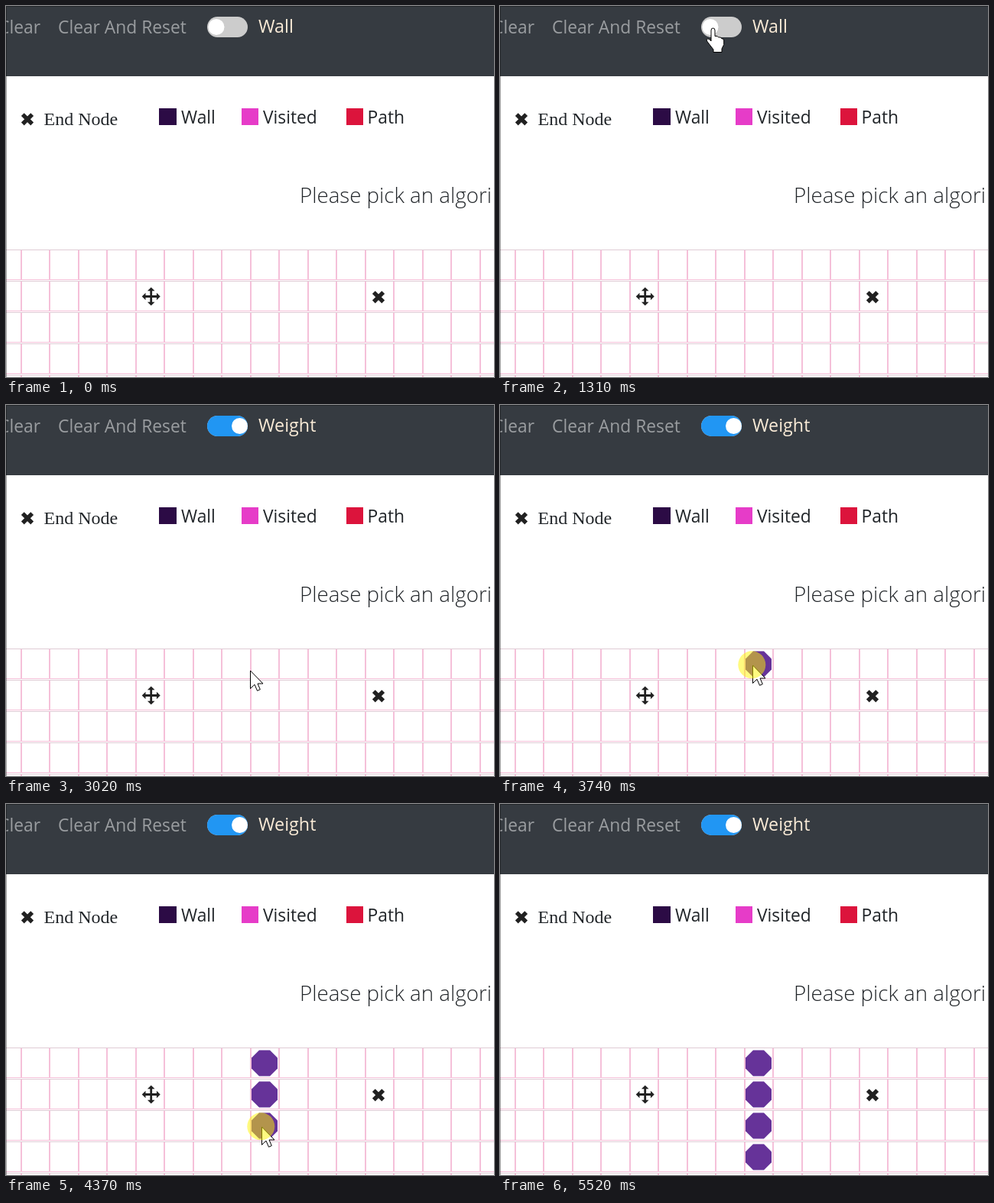
Write an HTML page that moves like this. It is 638 by 486 pixels and loops after 6360 ms.

```html
<!DOCTYPE html>
<html lang="en">
<head>
<meta charset="utf-8">
<title>Weighted grid</title>
<style>
  html, body { margin: 0; width: 100%; height: 100%; overflow: hidden; background: #fff; }
  svg { display: block; }
  text { font: 22.8px "Open Sans", "Noto Sans", sans-serif; fill: #212529; }
  .nav { fill: #9a9da0; }
  .mode { font-size: 23.3px; fill: #faebd7; }
  .serif { font: 24px "Liberation Serif", serif; }
  .title { font-size: 27.7px; font-weight: 300; }
  .crisp { shape-rendering: crispEdges; }
</style>
</head>
<body>
<svg width="638" height="486" viewBox="0 0 638 486">
  <defs>
    <path id="cross" d="M-6.2-6.2 6.2 6.2M6.2-6.2-6.2 6.2" stroke="#212121" stroke-width="5.4"/>
    <path id="arrows" fill="#212121" d="M-12 0l4.8-4.8v3.4h5.8v-5.8h-3.4L0-12l4.8 4.8H1.4v5.8h5.8v-3.4L12 0 7.2 4.8V1.4H1.4v5.8h3.4L0 12l-4.8-4.8h3.4V1.4h-5.8v3.4z"/>
  </defs>

  <rect width="638" height="92" fill="#363b41"/>
  <text class="nav" x="45" y="36" text-anchor="end">Clear</text>
  <text class="nav" x="68" y="36">Clear And Reset</text>
  <rect x="263" y="14" width="53" height="27" rx="13.5" fill="#ccc"/>
  <rect id="toggleOn" x="263" y="14" width="53" height="27" rx="13.5" fill="#2196f3"/>
  <circle id="knob" cy="27.5" r="10.5" fill="#fff"/>
  <text id="mode" class="mode" x="330" y="35">Wall</text>

  <use href="#cross" x="28" y="148.3"/>
  <text class="serif" x="49.5" y="156">End Node</text>
  <g class="crisp">
    <rect x="200" y="134" width="23" height="22" fill="#2c0b45"/>
    <rect x="308" y="134" width="22" height="22" fill="#e63cc8"/>
    <rect x="445" y="134" width="22" height="22" fill="#dc143c"/>
  </g>
  <text x="229" y="154">Wall</text>
  <text x="336" y="154">Visited</text>
  <text x="472.5" y="154">Path</text>
  <text class="title" x="384" y="258">Please pick an algori</text>

  <g id="grid" class="crisp"></g>
  <g id="weights"></g>
  <use href="#arrows" x="189.7" y="380.5"/>
  <use href="#cross" x="487" y="381.3"/>
  <path d="M.5 486V.5H638" fill="none" stroke="#000" stroke-opacity=".35"/>

  <g id="cursor" fill="#fff" stroke="#000" stroke-linejoin="round">
    <path id="pointer" d="M.5 1v23.5L6 19.2l3.5 8.1 3.8-1.7-3.3-7.6h7z"/>
    <path id="hand" d="M-2 3Q-2 0 .5 0T3 3v7.5q3.8-1 4.5 1.5 3.6-.8 4.2 1.7 3-.3 3 2.3v5.5L12 27v4.5H1V28l-7-9q-3-4-1-5 2-1 5 3z"/>
    <circle id="press" cx="-.7" cy=".3" r="18" fill="#fff600" fill-opacity=".5" stroke="none"/>
  </g>
</svg>
<script>
const LOOP = 6360, COLUMN = 37.5, ROW = 41, GRID_TOP = 319;
const $ = id => document.getElementById(id);
const clamp = v => Math.max(0, Math.min(1, v));
const progress = (t, start, end) => clamp((t - start) / (end - start));
const smooth = p => p * p * (3 - 2 * p);
const show = (node, on) => node.style.display = on ? "" : "none";

function add(parent, tag, attrs) {
  const node = document.createElementNS("http://www.w3.org/2000/svg", tag);
  for (const name in attrs) node.setAttribute(name, attrs[name]);
  return $(parent).appendChild(node);
}
const line = (x, y, width, height, fill) => add("grid", "rect", { x, y, width, height, fill });

for (let x = 20; x < 638; x += COLUMN) line(Math.floor(x) - 1, GRID_TOP, 2, 167, "#f5c0d9");
for (let y = GRID_TOP; y < 486; y += ROW) {
  line(0, y, 638, 1, "#dfcbd5");
  if (y > GRID_TOP) {
    line(0, y - 1, 638, 1, "#fff");
    line(0, y - 2, 638, 1, "#f5c0d9");
  }
}

const octagons = Array.from({ length: 4 }, () =>
  add("weights", "path", { d: "M-7-17H7L17-7V7L7 17H-7L-17 7V-7z", fill: "#639" }));

// Pointer moves, each continuing from where the last one ended.
const entry = { x: 508, y: 372 };
const moves = [
  { start: 310, end: 1000, x: 274, y: 31 },
  { start: 1000, end: 1310, x: 278, y: 29 },
  { start: 2280, end: 3020, x: 319, y: 347 },
  { start: 3020, end: 3340, x: 330, y: 340 },
  { start: 3740, end: 4700, x: 335, y: 453 },
  { start: 5210, end: 5520, x: 351, y: 478 }
];

function pointerAt(t) {
  return moves.reduce((at, move) => {
    const p = smooth(progress(t, move.start, move.end));
    return { x: at.x + (move.x - at.x) * p, y: at.y + (move.y - at.y) * p };
  }, entry);
}

function draw(t) {
  const on = 1 - (1 - progress(t, 1670, 2070)) ** 2.4;
  $("toggleOn").setAttribute("opacity", on);
  $("knob").setAttribute("cx", 275 + 30.5 * on);
  $("mode").textContent = t >= 1700 ? "Weight" : "Wall";

  const { x, y } = pointerAt(t);
  const dragging = t >= 3510 && t < 4900;
  const overToggle = x > 263 && x < 316 && y > 14 && y < 41;
  $("cursor").setAttribute("transform", `translate(${Math.round(x)} ${Math.round(y)})`);
  show($("cursor"), t >= 310 && t < 5520);
  show($("hand"), overToggle);
  show($("pointer"), !overToggle);
  show($("press"), dragging || (t >= 1560 && t < 1700));

  // A weight grows as the dragged pointer enters its row.
  octagons.forEach((octagon, row) => {
    const top = GRID_TOP + row * ROW;
    const size = clamp((y - top) / 8);
    show(octagon, t >= 3510 && size > 0);
    octagon.setAttribute("transform", `translate(338 ${top + 20.4}) scale(${size})`);
  });
}

function frame() {
  draw(performance.now() % LOOP);
  requestAnimationFrame(frame);
}
frame();
</script>
</body>
</html>
```
